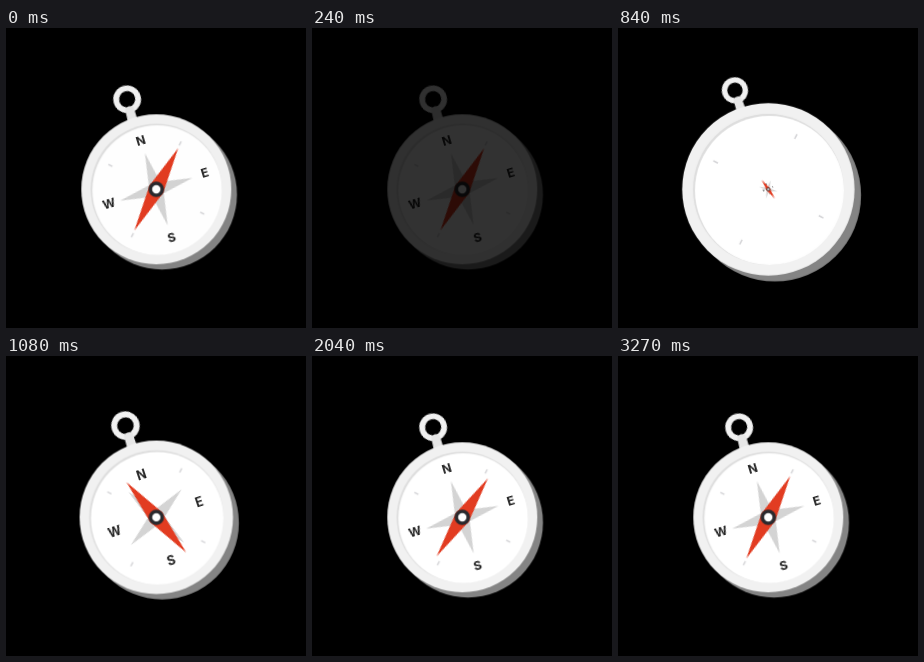
An HTML page for the animation above (3600 ms loop, 300x300 px).

```html
<!DOCTYPE html>
<html lang="en">
<head>
<meta charset="utf-8">
<title>Compass</title>
<style>
  html, body { margin: 0; width: 100%; height: 100%; overflow: hidden; background: #000; }
  svg { display: block; width: 100%; height: 100%; }

  .scene, .case, .loop, .letters, .grow, .star, .needle, text {
    animation: 3600ms ease-in-out infinite;
  }
  .scene   { animation-name: fade; }
  .case    { animation-name: pop; }
  .loop    { animation-name: loop; }
  .letters { animation-name: letters; }
  .grow    { animation-name: grow; }
  .star    { animation-name: turn; }
  .needle  { animation-name: swing; }

  text {
    font: 700 12.3px Inter, "Liberation Sans", sans-serif;
    fill: #222;
    text-anchor: middle;
    animation-name: letter;
  }

  @keyframes fade {
    0% { opacity: 1; animation-timing-function: linear; }
    8.333% { opacity: 0; animation-timing-function: step-end; }
    14.3%, 100% { opacity: 1; }
  }
  @keyframes pop {
    0% { transform: scale(1); animation-timing-function: step-end; }
    8.4%, 14.8% { transform: scale(0); }
    24% { transform: scale(1.16); }
    33.5% { transform: scale(.97); }
    42%, 100% { transform: scale(1); }
  }
  @keyframes loop {
    0% { transform: none; animation-timing-function: step-end; }
    8.4%, 16.67% { transform: rotate(0deg) scale(0); }
    24.17% { transform: rotate(-3deg) scale(.84); }
    30% { transform: rotate(-3deg) scale(1); }
    35% { transform: rotate(0deg) scale(1.05); }
    41.67%, 100% { transform: rotate(0deg) scale(1); }
  }
  @keyframes letters {
    0% { transform: scale(1); animation-timing-function: step-end; }
    8.4%, 20.83% { transform: rotate(-4deg) scale(0); }
    33.6% { transform: rotate(-1deg) scale(1.04); }
    40.28%, 100% { transform: rotate(0deg) scale(1); }
  }
  @keyframes letter {
    0% { transform: scale(1); animation-timing-function: step-end; }
    8.4%, 20.83% { transform: scale(1.28); }
    40.28%, 100% { transform: scale(1); }
  }
  @keyframes grow {
    0% { transform: scale(1); animation-timing-function: step-end; }
    8.4%, 19.17% { transform: scale(0); }
    32.5% { transform: scale(1.04); }
    40.28%, 100% { transform: scale(1); }
  }
  @keyframes turn {
    0% { transform: rotate(-17.5deg); animation-timing-function: step-end; }
    8.4%, 19.17% { transform: rotate(-81deg); }
    40.28%, 100% { transform: rotate(-17.5deg); }
  }
  @keyframes swing {
    0% { transform: rotate(28deg); animation-timing-function: step-end; }
    8.4%, 19.17% { transform: rotate(-34deg); }
    36.67% { transform: rotate(-43deg); }
    50.56% { transform: rotate(42deg); }
    64.9% { transform: rotate(19deg); }
    78.8% { transform: rotate(32deg); }
    91%, 100% { transform: rotate(28deg); }
  }
</style>
</head>
<body>
<svg viewBox="0 0 300 300">
  <g class="scene">
    <g transform="translate(150.3 161.3)">
      <g class="case">
        <circle cx="5.7" cy="5.2" r="75" fill="#848484"/>
        <g transform="translate(-24 -70)">
          <g class="loop">
            <g transform="rotate(-15)" fill="none">
              <circle cx=".5" cy="-20.3" r="11" stroke="#cdcdcd" stroke-width="5.3"/>
              <circle cy="-20.8" r="11" stroke="#f1f1f1" stroke-width="5.3"/>
              <path d="M-5 4L-4.4-12Q0-15 4.4-12L5 4Z" fill="#e6e6e6"/>
            </g>
          </g>
        </g>
        <circle r="75" fill="#f1f1f1"/>
        <circle r="65.6" fill="#dedede"/>
        <circle cx=".9" cy=".9" r="64.8" fill="#fff"/>
        <g transform="rotate(27.5)" stroke="#d3d3d6" stroke-width="1.3">
          <path d="M0-54V-49.5M0 54V49.5M-54 0H-49.5M54 0H49.5"/>
        </g>
        <g class="letters">
          <g transform="translate(-15.4 -48.4) rotate(-17)"><text y="4.4">N</text></g>
          <g transform="translate(48.6 -16.2) rotate(-17)"><text y="4.4">E</text></g>
          <g transform="translate(15.4 48.6) rotate(-17)"><text y="4.4">S</text></g>
          <g transform="translate(-47.3 14.7) rotate(-17)"><text y="4.4">W</text></g>
        </g>
        <g class="grow">
          <path class="star" d="M0-38L6-6L38 0L6 6L0 38L-6 6L-38 0L-6-6Z" fill="#d4d4d4"/>
          <path class="needle" d="M0-46.8L7.8 0L0 46.8L-7.8 0Z" fill="#e23c21"/>
          <circle r="6" fill="#fff" stroke="#2a2a2e" stroke-width="3.6"/>
        </g>
      </g>
    </g>
  </g>
</svg>
</body>
</html>
```
